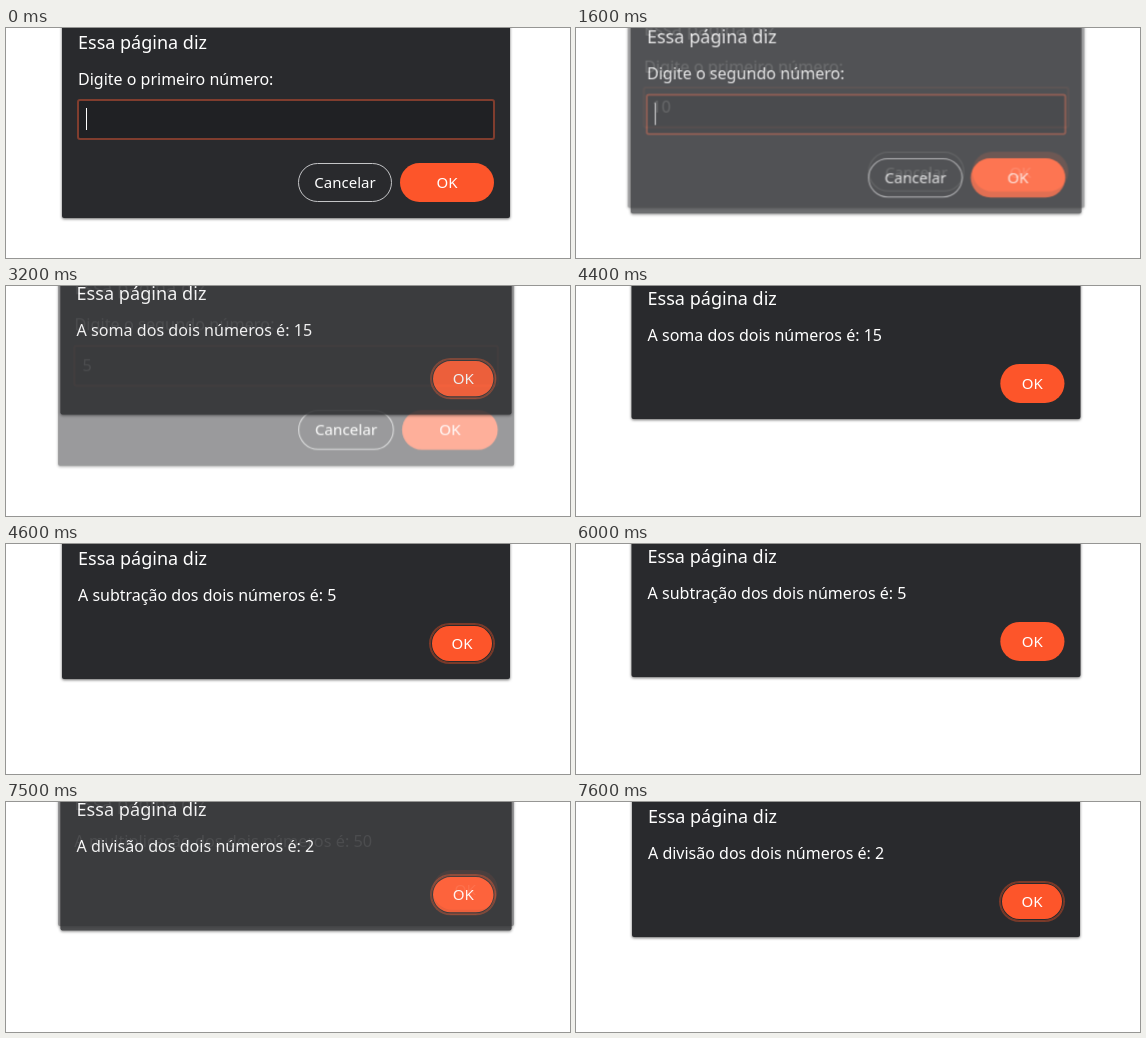
Animation of 564 by 230 pixels, one loop 8 s. Source, as an HTML page:

```html
<!DOCTYPE html>
<html lang="pt-BR">
<head>
<meta charset="utf-8">
<title>Calculadora</title>
<style>
:root {
  --loop: 8s step-end infinite;
  --dark: #292a2d;
  --orange: #fd552a;
  --ring: #7a3a29;
  --focus: inset 0 0 0 1px var(--ring), inset 0 0 0 2px var(--dark), 0 0 0 1px var(--ring);
  --blur: translateY(-2.3px) scale(1.0022);
  --leave: translateY(-13.4px) scale(1.018);
  --leave-alpha: .474;
  --enter: translateY(-7.5px) scale(1.007);
  --enter-alpha: .84;
}
html, body { margin: 0; width: 100%; height: 100%; overflow: hidden; background: #fff; }
body { position: relative; }

.dialog {
  position: absolute; left: 56px; top: -20px;
  width: 448px; height: 155px;
  border-radius: 2px;
  background: var(--dark);
  box-shadow: 0 1px 3px rgba(0, 0, 0, .6);
  color: #fff;
  font: 16px/24px "Noto Sans", sans-serif;
  white-space: pre;
  transform-origin: 224px 20px;
  opacity: 0;
}
.dialog.prompt { height: 210px; }
.dialog > * { position: absolute; box-sizing: border-box; margin: 0; }

h1 { left: 16px; top: 22px; font-size: 18px; font-weight: 400; }
p { left: 16px; top: 59px; }

.btn {
  top: 100px; height: 39px;
  border-radius: 20px;
  font-size: 15px; font-weight: 500; line-height: 39px;
  text-align: center;
}
.prompt .btn { top: 155px; }
.ok { left: 368px; width: 64px; background: var(--orange); box-shadow: var(--halo, var(--focus)); }
.prompt .ok { left: 338px; width: 94px; box-shadow: none; }
.cancel { left: 236px; width: 94px; border: 1px solid #c4c5c7; line-height: 37px; }

.field {
  left: 15px; top: 91px; width: 418px; height: 41px;
  border: 2px solid #803d2e; border-radius: 3px;
  background: #202124;
  line-height: 22px;
}
.field > * { position: absolute; left: 7px; top: 7px; }
.caret { width: 1px; height: 22px; background: #fff; }

/* Dialogs: enter, rest, lose focus, leave */
#first {
  --leave: translateY(-14px) scale(1.02); --leave-alpha: .4;
  animation: first var(--loop);
}
#second {
  --enter: translateY(-5.6px) scale(1.006); --enter-alpha: .68;
  animation: second var(--loop);
}
#sum { animation: sum var(--loop); }
#difference { animation: difference var(--loop); }
#product { animation: product var(--loop); }
#quotient { animation: quotient var(--loop); }

@keyframes first {
  0% { opacity: 1; transform: none; }
  18.75% { opacity: 1; transform: var(--blur); }
  20% { opacity: var(--leave-alpha); transform: var(--leave); }
  21.25%, 100% { opacity: 0; transform: none; }
}
@keyframes second {
  0% { opacity: 0; transform: none; }
  20% { opacity: var(--enter-alpha); transform: var(--enter); }
  21.25% { opacity: 1; transform: none; }
  38.75% { opacity: 1; transform: var(--blur); }
  40% { opacity: var(--leave-alpha); transform: var(--leave); }
  41.25%, 100% { opacity: 0; transform: none; }
}
@keyframes sum {
  0% { opacity: 0; transform: none; --halo: var(--focus); }
  40% { opacity: var(--enter-alpha); transform: var(--enter); --halo: var(--focus); }
  41.25% { opacity: 1; transform: none; --halo: var(--focus); }
  55% { opacity: 1; transform: var(--blur); --halo: none; }
  56.25% { opacity: var(--leave-alpha); transform: var(--leave); --halo: none; }
  57.5%, 100% { opacity: 0; transform: none; --halo: none; }
}
@keyframes difference {
  0% { opacity: 0; transform: none; --halo: var(--focus); }
  56.25% { opacity: var(--enter-alpha); transform: var(--enter); --halo: var(--focus); }
  57.5% { opacity: 1; transform: none; --halo: var(--focus); }
  75% { opacity: 1; transform: var(--blur); --halo: none; }
  76.25% { opacity: var(--leave-alpha); transform: var(--leave); --halo: none; }
  77.5%, 100% { opacity: 0; transform: none; --halo: none; }
}
@keyframes product {
  0% { opacity: 0; transform: none; --halo: var(--focus); }
  76.25% { opacity: var(--enter-alpha); transform: var(--enter); --halo: var(--focus); }
  77.5% { opacity: 1; transform: none; --halo: var(--focus); }
  93.75% { opacity: var(--leave-alpha); transform: var(--leave); --halo: none; }
  95%, 100% { opacity: 0; transform: none; --halo: none; }
}
@keyframes quotient {
  0% { opacity: 0; transform: none; }
  93.75% { opacity: var(--enter-alpha); transform: var(--enter); }
  95%, 100% { opacity: 1; transform: none; }
}

/* Typing: reveal whole digits, move and blink the caret */
.digits { overflow: hidden; width: 0; }
#first .digits { animation: type-ten var(--loop); }
#second .digits { animation: type-five var(--loop); }
#first .caret { animation: caret-ten var(--loop); }
#second .caret { animation: caret-five var(--loop); }

@keyframes type-ten {
  0% { width: 0; }
  8.75% { width: 1ch; }
  12.5%, 100% { width: 2ch; }
}
@keyframes type-five {
  0% { width: 0; }
  32.5%, 100% { width: 1ch; }
}
@keyframes caret-ten {
  0% { opacity: 1; transform: none; }
  3.75% { opacity: 0; transform: none; }
  8.75% { opacity: 1; transform: translateX(1ch); }
  12.5% { opacity: 1; transform: translateX(2ch); }
  18.75%, 100% { opacity: 0; transform: translateX(2ch); }
}
@keyframes caret-five {
  0% { opacity: 1; transform: none; }
  25% { opacity: 0; transform: none; }
  31.25% { opacity: 1; transform: none; }
  32.5% { opacity: 1; transform: translateX(1ch); }
  38.75%, 100% { opacity: 0; transform: translateX(1ch); }
}
</style>
</head>
<body>
<div class="dialog prompt" id="first">
  <h1>Essa página diz</h1>
  <p>Digite o primeiro número:</p>
  <div class="field"><span class="digits">10</span><i class="caret"></i></div>
  <div class="btn cancel">Cancelar</div>
  <div class="btn ok">OK</div>
</div>
<div class="dialog prompt" id="second">
  <h1>Essa página diz</h1>
  <p>Digite o segundo número:</p>
  <div class="field"><span class="digits">5</span><i class="caret"></i></div>
  <div class="btn cancel">Cancelar</div>
  <div class="btn ok">OK</div>
</div>
<div class="dialog" id="sum">
  <h1>Essa página diz</h1>
  <p>A soma dos dois números é: 15</p>
  <div class="btn ok">OK</div>
</div>
<div class="dialog" id="difference">
  <h1>Essa página diz</h1>
  <p>A subtração dos dois números é: 5</p>
  <div class="btn ok">OK</div>
</div>
<div class="dialog" id="product">
  <h1>Essa página diz</h1>
  <p>A multiplicação dos dois números é: 50</p>
  <div class="btn ok">OK</div>
</div>
<div class="dialog" id="quotient">
  <h1>Essa página diz</h1>
  <p>A divisão dos dois números é: 2</p>
  <div class="btn ok">OK</div>
</div>
</body>
</html>
```
